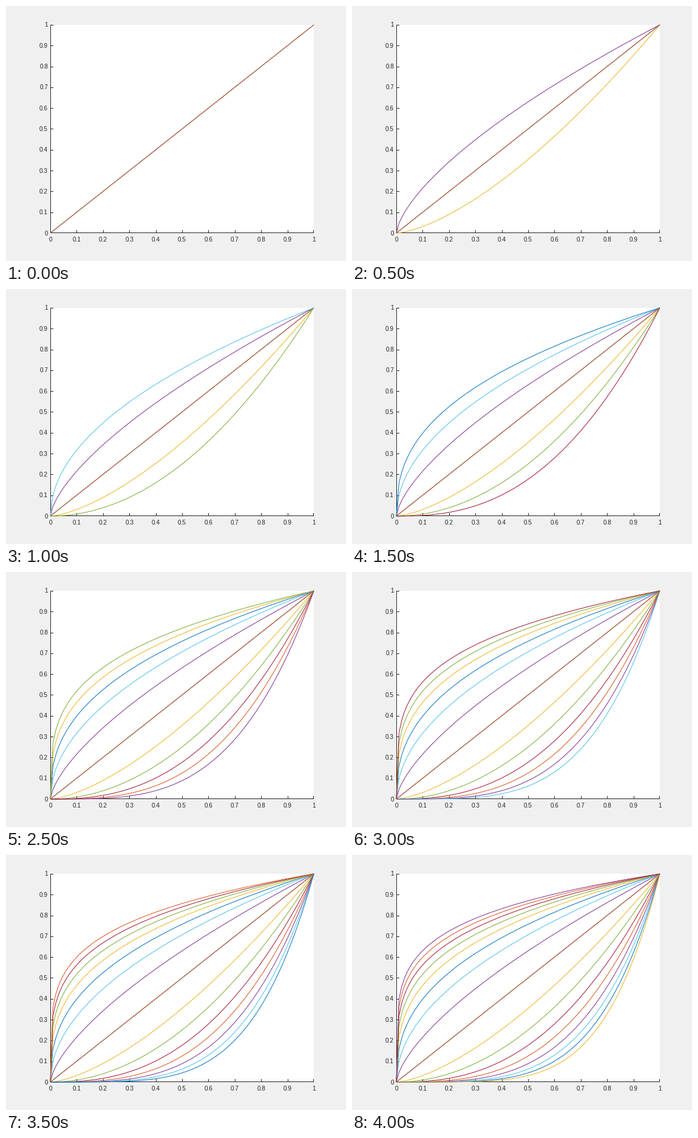
Write a matplotlib script that moves like this. It is 560 by 420 pixels and loops after 4.5 s.

```python
import numpy as np
import matplotlib.pyplot as plt
from matplotlib.animation import FuncAnimation
from matplotlib.patches import Rectangle

W, H, DPI = 560, 420, 100
PX = 72 / DPI  # one pixel in points
LEFT, RIGHT, TOP, BOTTOM = 73, 507, 31, 374
INK = "#262626"
COLORS = ["#0072bd", "#d95319", "#edb120", "#7e2f8e",
          "#77ac30", "#4dbeee", "#a2142f"]
STEPS = 9

fig = plt.figure(figsize=(W / DPI, H / DPI), dpi=DPI, facecolor="#f0f0f0")
ax = fig.add_axes([0, 0, 1, 1])
ax.set_xlim(0, W)
ax.set_ylim(H, 0)
ax.axis("off")


def to_x(u):
    return LEFT + u * (RIGHT - LEFT)


def to_y(v):
    return BOTTOM - v * (BOTTOM - TOP)


def bar(x, y, w, h, color=INK):
    ax.add_patch(Rectangle((x, y), w, h, fc=color, lw=0,
                           antialiased=False, zorder=1))


def label(x, y, text, ha):
    ax.text(x, y, text, ha=ha, va="baseline", color=INK,
            family="Liberation Sans", size=10 * PX)


def draw_axes():
    bar(LEFT, TOP, RIGHT - LEFT, BOTTOM - TOP, "white")
    bar(LEFT, TOP, 1, BOTTOM - TOP)
    bar(LEFT, BOTTOM - 1, RIGHT - LEFT, 1)
    for i in range(11):
        u = i / 10
        x, y = round(to_x(u)), round(to_y(u))
        bar(min(x, RIGHT - 1), BOTTOM - 5, 1, 5)
        bar(LEFT, min(y, BOTTOM - 1), 5, 1)
        label(to_x(u), 388, f"{u:g}", "center")
        label(69, to_y(u) + 3.5, f"{u:g}", "right")


def make_curves():
    u = np.linspace(0, 1, 101)
    curves = []
    for k in range(STEPS):
        n = 1 + k / 2
        for power in (n, 1 / n):
            color = COLORS[len(curves) % len(COLORS)]
            curves += ax.plot(to_x(u), to_y(u ** power), color=color,
                              lw=PX, zorder=2, solid_capstyle="butt")
    return curves


draw_axes()
curves = make_curves()


def update(step):
    for i, curve in enumerate(curves):
        curve.set_visible(i // 2 <= step)
    return curves


anim = FuncAnimation(fig, update, frames=STEPS, interval=500,
                     init_func=lambda: update(0), repeat=True, repeat_delay=0)
plt.show()
```
